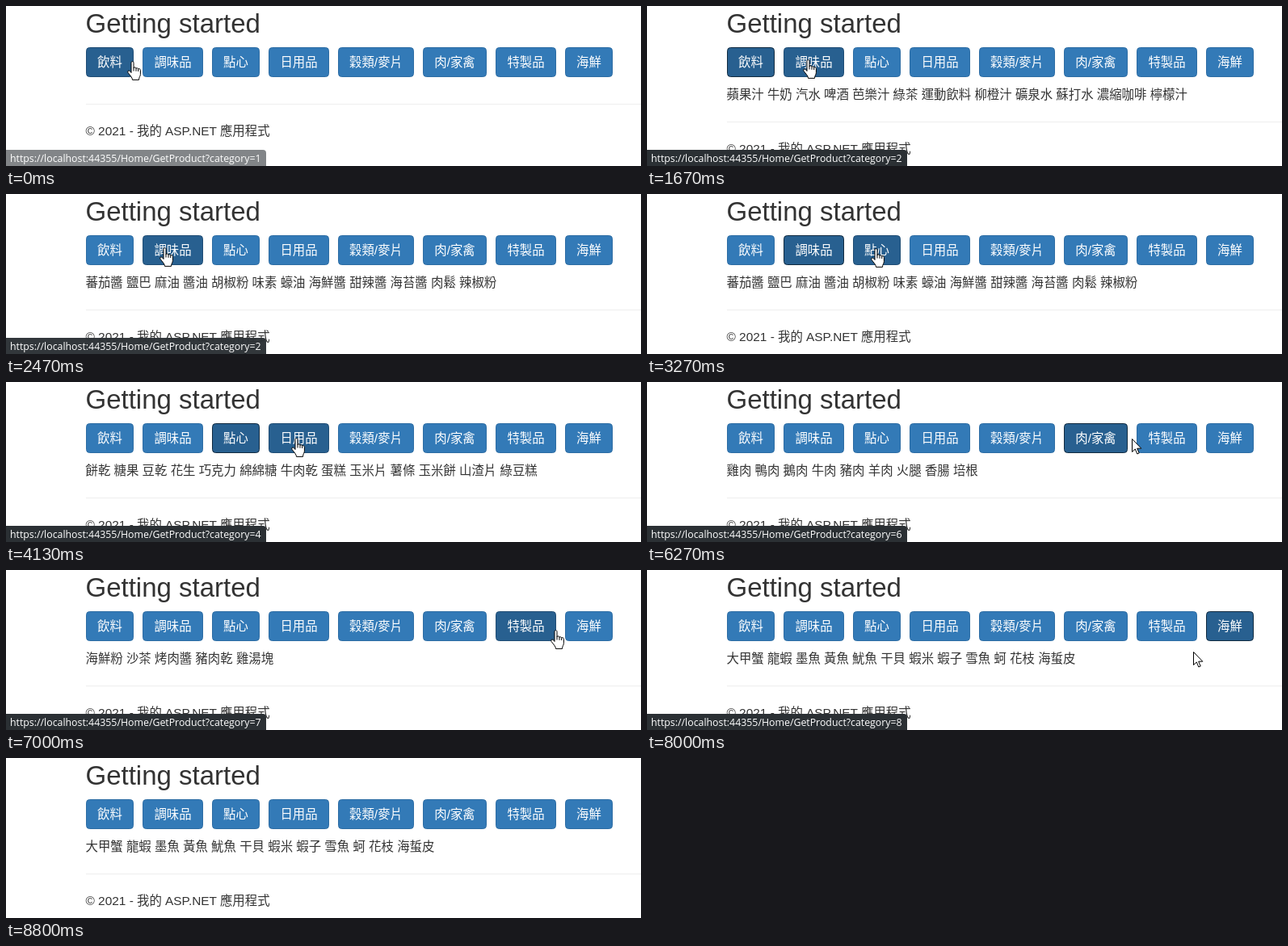
An HTML page for the animation above (8940 ms loop, 786 by 198 pixels).

```html
<!DOCTYPE html>
<html lang="zh-Hant">
<head>
<meta charset="utf-8">
<title>Getting started</title>
<style>
html, body { margin: 0; width: 100%; height: 100%; overflow: hidden; background: #fff; }
svg { display: block; width: 786px; height: 198px; }
text { font: 15.4px "Liberation Sans", Arial, "Noto Sans CJK TC", "Noto Sans CJK", sans-serif; fill: #333; white-space: pre; }
.title { font-size: 33px; }
.btn rect { fill: #337ab7; stroke: #2e6da4; }
.btn text { fill: #fff; text-anchor: middle; }
.btn.focus rect { fill: #286090; stroke: #122b40; }
.btn.hover rect { fill: #286090; stroke: #204d74; }
.btn.down rect { fill: #204d74; stroke: #122b40; }
#status path { fill: #2b3034; }
#status text { font: 12.35px "Open Sans", "Noto Sans", sans-serif; fill: #fff; }
#hand, #arrow { fill: #fff; stroke: #000; stroke-linejoin: round; }
</style>
</head>
<body>
<svg viewBox="0 0 786 198">
  <text class="title" x="98.5" y="33">Getting started</text>
  <g id="menu"></g>
  <text id="list" x="98.5" y="115"></text>
  <g id="foot">
    <rect x="99" y="121" width="687" height="1" fill="#eee"/>
    <text x="98.5" y="160">© 2021 - 我的 ASP.NET 應用程式</text>
  </g>
  <g id="status">
    <path d="M0 178H318Q322 178 322 182V198H0Z"/>
    <text id="link" x="5" y="193"></text>
  </g>
  <g id="cursor">
    <path id="hand" d="M5 14.5V2.3C5 .1 8 .1 8 2.3V9C8 7.3 11 7.5 11 9.5C11 8.3 13.7 8.5 13.7 10.3C13.8 9.2 16.4 9.3 16.4 11.6V16.5C16.4 19 14.5 20 14.5 23.4H6.5C6.5 20.5 3.5 18 1 14.4C0 12.3 2 11.3 3.3 12.5ZM8 9V12.5M11 9.5V12.8M13.7 10.3V13"/>
    <path id="arrow" d="M6.5 1.5V17.5L10.3 14 12.8 20 15.2 19 12.7 13.2H17.8Z"/>
  </g>
</svg>
<script>
const LOOP = 8940, FADE_IN = 120, FADE_OUT = 270;

// label, left, width, time pressed, time its list shows, list
const items = [
  ['飲料', 99, 59, 1130, 1200, '蘋果汁 牛奶 汽水 啤酒 芭樂汁 綠茶 運動飲料 柳橙汁 礦泉水 蘇打水 濃縮咖啡 檸檬汁'],
  ['調味品', 169, 75, 1870, 1930, '蕃茄醬 鹽巴 麻油 醬油 胡椒粉 味素 蠔油 海鮮醬 甜辣醬 海苔醬 肉鬆 辣椒粉'],
  ['點心', 255, 59, 3800, 3870, '餅乾 糖果 豆乾 花生 巧克力 綿綿糖 牛肉乾 蛋糕 玉米片 薯條 玉米餅 山渣片 綠豆糕'],
  ['日用品', 325, 75, 4670, 4730, '牙膏 牙刷 毛巾 香皂 洗髮精 面紙 肥皂 梳子 臉盆 拖鞋 雨傘 杯子 碗盤 筷子 湯匙 抹布 掃把'],
  ['穀類/麥片', 411, 94, 5330, 5470, '再來米 燕麥 糙米 三合一麥片 白米 小米 黃豆'],
  ['肉/家禽', 516, 79, 6070, 6130, '雞肉 鴨肉 鵝肉 牛肉 豬肉 羊肉 火腿 香腸 培根'],
  ['特製品', 606, 75, 6670, 6730, '海鮮粉 沙茶 烤肉醬 豬肉乾 雞湯塊'],
  ['海鮮', 692, 59, 7600, 7730, '大甲蟹 龍蝦 墨魚 黃魚 魷魚 干貝 蝦米 蝦子 雪魚 蚵 花枝 海蜇皮']
].map(([label, x, w, press, show, list]) => ({ label, x, w, press, show, list }));

// pointer stops: time, left, top
const path = [
  [0, 150, 68], [130, 148, 65], [200, 148, 65], [470, 119, 64], [1200, 119, 64],
  [1400, 199, 66], [1600, 199, 66], [1670, 193, 66], [1730, 190, 66], [2800, 190, 66],
  [3270, 277, 67], [3870, 277, 67], [4130, 353, 69], [4730, 353, 69], [5000, 430, 69],
  [5470, 430, 69], [5730, 547, 69], [6130, 547, 69], [6400, 636, 69], [6730, 636, 69],
  [7000, 674, 74], [7330, 712, 69], [7870, 712, 69], [8130, 627, 130]
];
const GONE = 8200, BLUR = 8800;

// status bubble: fade-in start, fade-out start
const shown = [[-70, 2460], [3400, 8330]];

const $ = id => document.getElementById(id);
const clamp = v => Math.min(1, Math.max(0, v));
const last = (test) => items.reduce((found, it, i) => test(it) ? i : found, -1);

$('menu').innerHTML = items.map(({ label, x, w }) =>
  `<g class="btn"><rect x="${x + .5}" y="51.5" width="${w - 1}" height="36" rx="4"/>` +
  `<text x="${x + w / 2}" y="75">${label}</text></g>`).join('');
const buttons = [...$('menu').children];

// screen time of a tick, 15 per second
const tickTime = n => Math.round(n * 20 / 3) * 10;

function pointer(t) {
  const i = path.findIndex(p => p[0] > t);
  if (i < 0) return path[path.length - 1].slice(1);
  const [t0, x0, y0] = path[i - 1], [t1, x1, y1] = path[i];
  const k = (t - t0) / (t1 - t0), e = k * k * (3 - 2 * k);
  return [Math.round(x0 + (x1 - x0) * e), Math.round(y0 + (y1 - y0) * e)];
}

function hovered(t) {
  if (t >= GONE) return -1;
  const [x, y] = pointer(t), tip = x + 6;
  return y + 1 < 51 || y + 1 > 88 ? -1 : items.findIndex(b => tip >= b.x && tip <= b.x + b.w);
}

function draw(n) {
  const t = tickTime(n), hover = hovered(t);
  const focus = t < BLUR ? last(b => b.press <= t) : -1;
  const list = last(b => b.show <= t);

  buttons.forEach((el, i) => {
    el.classList.toggle('hover', i === hover);
    el.classList.toggle('focus', i === focus);
    el.classList.toggle('down', i === focus && t < items[i].show);
  });
  $('list').textContent = list < 0 ? '' : items[list].list;
  $('foot').setAttribute('transform', `translate(0 ${list < 0 ? 0 : 22})`);

  let k = n;
  while (hovered(tickTime(k)) < 0) k--;
  $('link').textContent = 'https://localhost:44355/Home/GetProduct?category=' + (hovered(tickTime(k)) + 1);
  $('status').setAttribute('opacity', Math.max(...shown.map(([a, b]) =>
    Math.min(clamp((t - a) / FADE_IN), clamp(1 - (t - b) / FADE_OUT)))));

  $('cursor').setAttribute('transform', `translate(${pointer(t)})`);
  $('cursor').setAttribute('visibility', t < GONE ? 'visible' : 'hidden');
  $('hand').setAttribute('display', hover < 0 ? 'none' : 'inline');
  $('arrow').setAttribute('display', hover < 0 ? 'inline' : 'none');
}

const start = performance.now();
let shownTick = -1;
function frame(now) {
  const t = Math.max(0, now - start) % LOOP;
  const n = Math.floor((t + 4) * 3 / 200);
  if (n !== shownTick) draw(shownTick = n);
  requestAnimationFrame(frame);
}
frame(start);
</script>
</body>
</html>
```
